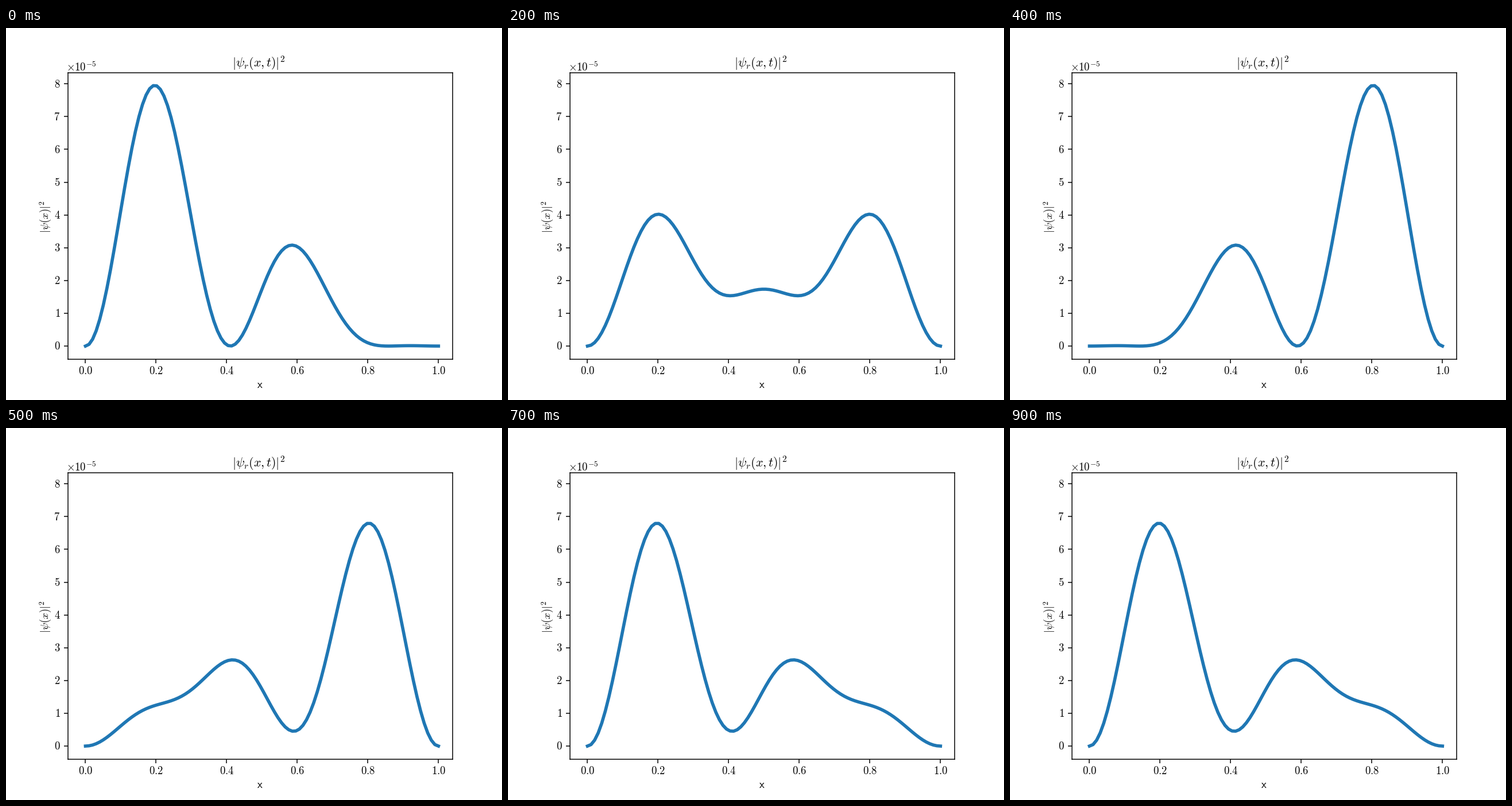
Recreate the animation shown at these times as a matplotlib script. Size 864x648 px, loop 1000 ms.

```python
import numpy as np
import matplotlib.pyplot as plt
from matplotlib.animation import FuncAnimation

WIDTH, HEIGHT, DPI = 864, 648, 135
FRAMES, INTERVAL = 10, 100
PHASE_STEP = np.pi / 4
RATIO = 0.8      # weight of the third mode against the second
PEAK = 7.944     # largest density, in units of 1e-5
SPAN = 0.99      # x range the axis margins are based on
MARGIN = 0.05

plt.rcParams["mathtext.fontset"] = "cm"

x = np.linspace(0, 1, 100)
mode2 = np.sin(2 * np.pi * x)
mode3 = RATIO * np.sin(3 * np.pi * x)
scale = PEAK / np.max((mode2 + mode3) ** 2)


def density(frame):
    wave = mode2 + mode3 * np.exp(-1j * PHASE_STEP * frame)
    return scale * np.abs(wave) ** 2


fig, ax = plt.subplots(figsize=(WIDTH / DPI, HEIGHT / DPI), dpi=DPI)
fig.subplots_adjust(left=0.125, right=0.9, bottom=0.11, top=0.88)
line, = ax.plot(x, density(0), color="C0", lw=3)
ax.set_xlim(-MARGIN * SPAN, (1 + MARGIN) * SPAN)
ax.set_ylim(-MARGIN * PEAK, (1 + MARGIN) * PEAK)
ax.set_xticks(np.linspace(0, 1, 6), labels=[])
ax.set_yticks(range(9), labels=[])


def label(px, py, tex, size=10, **kwargs):
    """Place math text with its baseline at a pixel position from the top left."""
    fig.text(px / WIDTH, 1 - py / HEIGHT, f"${tex}$", fontsize=size,
             va="baseline", **kwargs)


for value in np.linspace(0, 1, 6):
    px = ax.transData.transform((value, 0))[0]
    label(px, 603.2, f"{value:.1f}", ha="center")
for value in range(9):
    py = HEIGHT - ax.transData.transform((0, value))[1]
    label(94.5, py + 6.4, str(value), ha="right")

label(393.5, 67.6, r"|\psi_r(x,t)|^2", size=11.7)
label(105, 75, r"\times 10^{-5}")
label(442.5, 626.9, r"\mathsf{x}", ha="center")
label(75, 357, r"|\psi(x)|^2", rotation=90, rotation_mode="anchor")


def update(frame):
    line.set_ydata(density(frame))
    return line,


anim = FuncAnimation(fig, update, frames=FRAMES, interval=INTERVAL,
                     repeat=True, repeat_delay=0)
plt.show()
```
